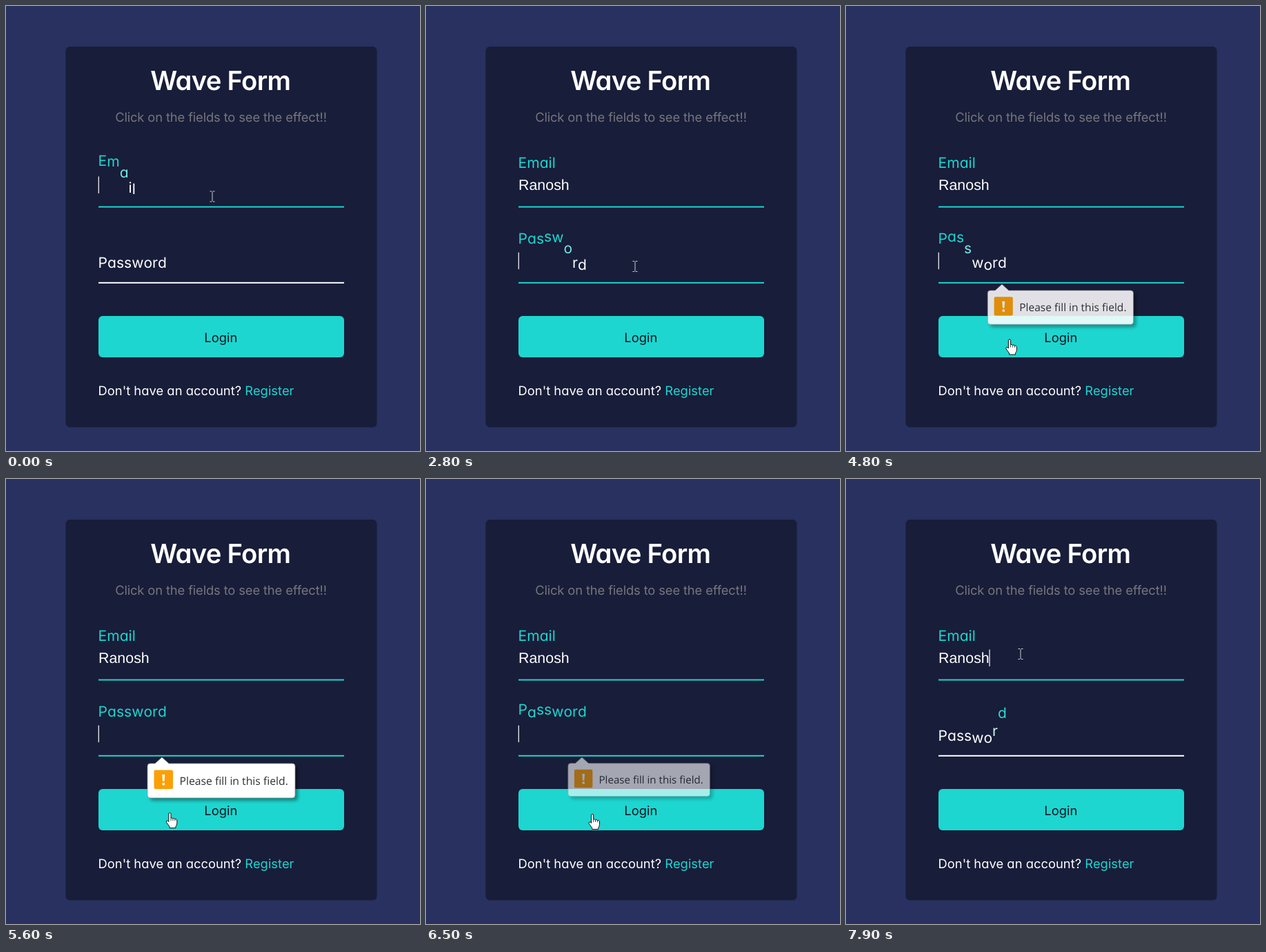
An HTML page that plays this animation: 600x646 px, repeating every 8 s.

```html
<!DOCTYPE html>
<html lang="en">
<head>
<meta charset="utf-8">
<title>Wave Form</title>
<style>
  html, body { margin: 0; width: 100%; height: 100%; overflow: hidden; background: #28315f; }
  svg { display: block; width: 600px; height: 646px; }
  text {
    font-family: Inter, Lato, sans-serif;
    font-feature-settings: "cv11";
    text-rendering: geometricPrecision;
    white-space: pre;
    fill: #fff;
  }
  .title { font-size: 38.3px; font-weight: 600; letter-spacing: -.74px; }
  .hint { font-size: 18.4px; letter-spacing: -.15px; fill: #76767d; }
  .label { font-size: 21.1px; }
  .value { font: 21.4px "Liberation Sans", Arial, sans-serif; }
  .small { font-size: 18.4px; }
  .mid { text-anchor: middle; }
  .teal { fill: #1dd6cf; }
  .btn text { font-size: 18.4px; fill: #0a1420; }
  .tip { filter: drop-shadow(4px 4px 2px rgba(0, 0, 0, .35)); }
  .tip text { font: 15.75px "Open Sans", "Noto Sans", sans-serif; fill: #303036; }
</style>
</head>
<body>
<svg viewBox="0 0 600 646">
  <rect width="600" height="646" fill="#28315f"/>
  <rect x="86.5" y="59" width="451" height="552.5" rx="6" fill="#181d39"/>
  <text class="title mid" x="310.7" y="121.5">Wave Form</text>
  <text class="hint mid" x="311.5" y="168">Click on the fields to see the effect!!</text>

  <text class="label" id="email" x="133.5"></text>
  <text class="value" id="value" x="134" y="267"></text>
  <rect class="teal" x="134" y="290.6" width="356" height="2"/>

  <text class="label" id="password" x="133.5"></text>
  <rect id="line" x="134" y="400.8" width="356" height="2"/>
  <rect id="caret" width="1.2" height="24.5" fill="#fff"/>

  <g class="btn" id="btn">
    <rect class="teal" x="134" y="450" width="356" height="60" rx="6"/>
    <text class="mid" x="311.3" y="487.5">Login</text>
  </g>
  <text class="small" x="133.5" y="564.5">Don't have an account? <tspan class="teal">Register</tspan></text>

  <g class="tip" id="tip">
    <path d="M209 413H216L226 404L236 413H415Q419 413 419 417V459Q419 463 415 463H209Q205 463 205 459V417Q205 413 209 413Z"
      fill="#fff" stroke="#8a8a90" stroke-width=".7"/>
    <rect x="214.5" y="422.5" width="27.5" height="27.5" rx="2" fill="#fc9f05"/>
    <path d="M226.3 429H230.3L229.5 439H227.1ZM226.6 441H230V444.4H226.6Z" fill="#fff"/>
    <text x="251.5" y="444">Please fill in this field.</text>
  </g>

  <g id="cursor">
    <path id="beam" d="M-3.5 -7.5H-.8M.8 -7.5H3.5M0 -7V7M-3.5 7.5H-.8M.8 7.5H3.5" fill="none" stroke="#d0d0d4"/>
    <path id="arrow" d="M0 0V15L3.5 11.8L6 17.5L8.3 16.5L5.8 11H10.3Z" fill="#fff" stroke="#111" stroke-width=".8"/>
    <g id="hand" fill="#fff" stroke="#111">
      <path d="M-1.6 13V1.6Q-1.6 0 0 0Q1.6 0 1.6 1.6V7.6Q3.4 6.8 4.5 8.3Q6.3 7.4 7.4 9Q9.4 8.4 10.4 10.4V15Q10.4 18 8.6 19.6V22H-.4V20L-4.8 14Q-5.6 12 -4.2 11.2Q-2.8 11.2 -1.6 13Z"/>
      <path d="M1.6 7.6V11.5M4.5 8.3V11.5M7.4 9V11.8" fill="none" stroke-width=".8"/>
    </g>
  </g>
</svg>
<script>
const LOOP = 8000, STEP = 100;
const NAME = 'Ranosh', KEY_START = 600, KEY_GAP = 180;
const EMAIL = 0, PASS = 1, NONE = -1;

// [time, focused field]; no field has focus while the button is held down
const FOCUS = [
  [-250, EMAIL], [2400, PASS], [3240, EMAIL], [4400, NONE],
  [4500, PASS], [6115, NONE], [6290, PASS], [7437, EMAIL]
];

// [time, x, y]
const POINTER = [
  [0, 299, 276.5], [1900, 299, 277], [2350, 303, 378], [2800, 303, 378],
  [3200, 285, 266], [3350, 285, 266], [3800, 272, 471.5], [4300, 237, 484],
  [5500, 237, 484], [6000, 241, 490], [6450, 241, 490], [7100, 248, 284],
  [7400, 253, 254], [8000, 253, 254]
];

const $ = id => document.getElementById(id);
const set = (el, attrs) => { for (const k in attrs) el.setAttribute(k, attrs[k]); };
const clamp = v => Math.min(1, Math.max(0, v));
const mix = (a, b, p) => a + (b - a) * p;

function bezier(x1, y1, x2, y2) {
  const at = (a, b, u) => 3 * a * u * (1 - u) ** 2 + 3 * b * u * u * (1 - u) + u ** 3;
  return x => {
    if (x <= 0 || x >= 1) return clamp(x);
    let lo = 0, hi = 1;
    for (let i = 0; i < 24; i++) {
      const u = (lo + hi) / 2;
      if (at(x1, x2, u) < x) lo = u; else hi = u;
    }
    return at(y1, y2, lo);
  };
}
const wave = bezier(.68, -.55, .265, 1.55);

function makeLabel(id, text, restY, moves) {
  const letters = [...text].map(ch => {
    const span = document.createElementNS('http://www.w3.org/2000/svg', 'tspan');
    span.textContent = ch;
    $(id).append(span);
    return span;
  });
  return t => letters.forEach((span, i) => {
    const lift = liftAt(moves, i * 50, t);
    const tint = clamp(lift);
    const rgb = [[255, 29], [255, 214], [255, 207]].map(([a, b]) => Math.round(mix(a, b, tint)));
    set(span, { y: restY - 35.3 * lift, fill: `rgb(${rgb})` });
  });
}

// Each move starts from wherever the letter is when the move begins
function liftAt(moves, delay, t) {
  let from = 0, to = 0, start = -1e4;
  const now = time => mix(from, to, wave((time - start - delay) / 300));
  for (const [time, target] of moves) {
    if (time > t) break;
    from = now(time);
    to = target;
    start = time;
  }
  return now(t);
}

const drawEmail = makeLabel('email', 'Email', 270.3, [[-250, 1]]);
const drawPassword = makeLabel('password', 'Password', 380,
  FOCUS.map(([time, field]) => [time, field === PASS ? 1 : 0]));

function drawPointer(t) {
  const i = POINTER.findIndex(p => p[0] > t);
  const [t0, x0, y0] = POINTER[i - 1], [t1, x1, y1] = POINTER[i];
  const u = (t - t0) / (t1 - t0), p = u * u * (3 - 2 * u);
  const x = mix(x0, x1, p), y = mix(y0, y1, p);
  const inField = (y > 240 && y < 283) || (y > 355 && y < 403);
  const kind = inField ? 'beam' : y > 450 && y < 510 ? 'hand' : 'arrow';
  for (const id of ['beam', 'arrow', 'hand']) $(id).style.display = id === kind ? '' : 'none';
  set($('cursor'), { transform: `translate(${x} ${y})` });
}

function drawCaret(t, field, since) {
  const typed = Math.min(NAME.length, Math.max(0, Math.floor((t - KEY_START) / KEY_GAP) + 1));
  $('value').textContent = NAME.slice(0, typed);
  const lastKey = typed ? KEY_START + (typed - 1) * KEY_GAP : since;
  const on = field !== NONE && (t - Math.max(since, lastKey)) % 1000 < 500;
  const width = field === EMAIL && typed ? $('value').getComputedTextLength() : 0;
  set($('caret'), { x: 133.7 + width, y: field === EMAIL ? 247.5 : 357.7, opacity: on ? 1 : 0 });
}

function drawTip(t, field, since) {
  const p = field === PASS && since >= 4500 ? clamp((t - since) / 345) : 0;
  set($('tip'), { opacity: p, transform: `translate(226 404) scale(${.9 + .1 * p}) translate(-226 -404)` });
}

function draw(t) {
  const [since, field] = FOCUS.filter(f => f[0] <= t).pop();
  drawEmail(t);
  drawPassword(t);
  drawCaret(t, field, since);
  drawTip(t, field, since);
  drawPointer(t);
  set($('line'), { fill: field === PASS ? '#1dd6cf' : '#fff' });
  const press = field === NONE ? .98 : 1;
  set($('btn'), { transform: `translate(312 480) scale(${press}) translate(-312 -480)` });
}

const begin = performance.now();
function tick() {
  const t = (performance.now() - begin) % LOOP;
  draw(Math.floor(t / STEP) * STEP);
  requestAnimationFrame(tick);
}
tick();
</script>
</body>
</html>
```
